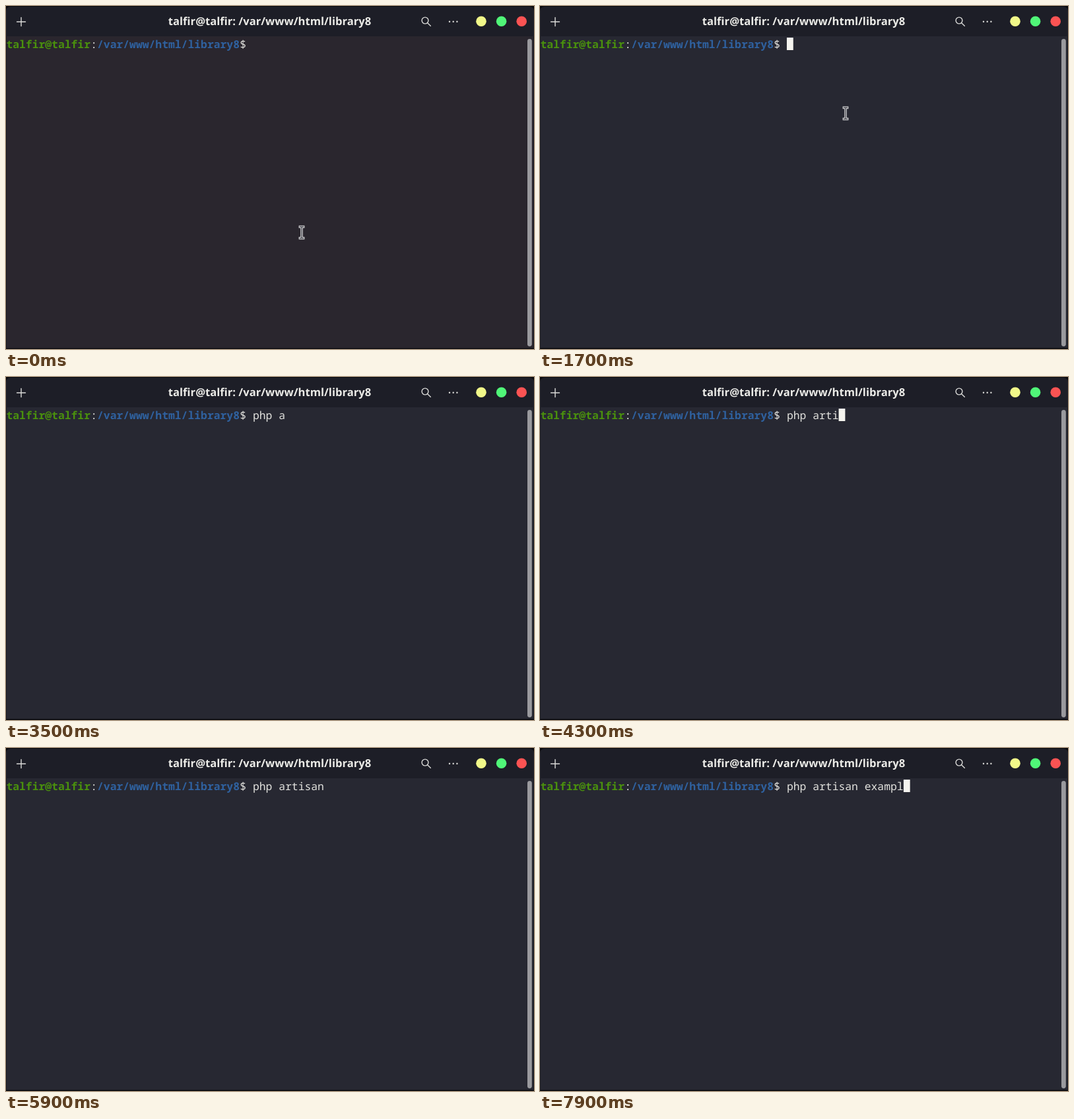
An HTML page for the animation above (8 s loop, 800 px wide and 521 px high).

```html
<!DOCTYPE html>
<html lang="en">
<head>
<meta charset="utf-8">
<title>Terminal</title>
<style>
  html, body { margin: 0; width: 100%; height: 100%; overflow: hidden; background: #08080b; }
  svg { display: block; width: 800px; height: 521px; }
  text { white-space: pre; text-rendering: geometricPrecision; }
  .title { font: 700 16.6px "Noto Sans", "Open Sans", sans-serif; fill: #ebebe7; text-anchor: middle; }
  .term { font: 500 16.38px "Noto Sans Mono", "DejaVu Sans Mono", monospace; fill: #e2e2de; }
  .bold { font-weight: 700; }
  .user { fill: #4a910d; }
  .path { fill: #2f619f; }
  .icon { fill: none; stroke: #dcdcda; stroke-width: 1.4; stroke-linecap: round; }
  .beam { fill: none; stroke: #d0d0d2; stroke-width: 3.6; stroke-linecap: square; }
  .beam.core { stroke: #3c3d45; stroke-width: 1.2; }
</style>
</head>
<body>
<svg viewBox="0 0 800 521">
  <defs>
    <path id="ibeam" d="M-2.6-8.6H2.6M0-8.6V8.6M-2.6 8.6H2.6"/>
  </defs>

  <path fill="#272832" d="M0 40H800V519.5H0Z"/>
  <path id="tint" fill="#2b272f" d="M0 46H800V519.5H0Z"/>
  <path fill="#1d1e27" d="M0 46V8Q0 1 7 1H793Q800 1 800 8V46Z"/>
  <path stroke="#17181f" d="M.5 46V519.5M799.5 46V519.5"/>

  <path class="icon" d="M16.5 24H29.5M23 17.5V30.5"/>
  <text class="title" x="399.5" y="29">talfir@talfir: /var/www/html/library8</text>
  <g class="icon">
    <circle cx="635" cy="22" r="4.9"/>
    <path d="M638.7 25.7L643.3 30.3"/>
  </g>
  <g fill="#dcdcda">
    <circle cx="672" cy="23.7" r="1.2"/>
    <circle cx="677.7" cy="23.7" r="1.2"/>
    <circle cx="683.4" cy="23.7" r="1.2"/>
  </g>
  <circle cx="720" cy="23.2" r="7.8" fill="#f1f889"/>
  <circle cx="750.6" cy="23.2" r="7.8" fill="#50f678"/>
  <circle cx="781.2" cy="23.2" r="7.8" fill="#fb5353"/>

  <rect x="790" y="50" width="6.8" height="467" rx="3.4" fill="#9a9a9e"/>

  <g class="term">
    <text class="bold user" data-col="0" y="64">talfir@talfir</text>
    <text data-col="13" y="64">:</text>
    <text class="bold path" data-col="14" y="64">/var/www/html/library8</text>
    <text data-col="36" y="64">$</text>
    <text id="typed" data-col="38" y="64"></text>
  </g>
  <rect id="caret" y="48" width="9.8" height="19" fill="#f5f4ef"/>

  <g id="mouse">
    <use href="#ibeam" class="beam"/>
    <use href="#ibeam" class="beam core"/>
  </g>
</svg>
<script>
  const LOOP = 8000, BLINK = 600, CELL = 9.83, LEFT = 0.4, PROMPT = 38;
  const COMMAND = "php artisan exampl";
  // Time of each key press, in ms
  const KEYS = [1900, 2100, 2200, 2800, 2900, 3700, 3900, 4100, 4600,
                4800, 5000, 5300, 6700, 6900, 7300, 7500, 7600, 7800];
  const [typed, caret, mouse, tint] =
    ["typed", "caret", "mouse", "tint"].map(id => document.getElementById(id));
  const colX = col => LEFT + col * CELL;
  const show = (el, on) => el.setAttribute("visibility", on ? "visible" : "hidden");

  for (const el of document.querySelectorAll("[data-col]")) el.setAttribute("x", colX(+el.dataset.col));

  function draw(t) {
    const count = KEYS.filter(k => k <= t).length;
    typed.textContent = COMMAND.slice(0, count);

    // Each key press restarts the blink
    const since = t - (count ? KEYS[count - 1] : 400);
    caret.setAttribute("x", colX(PROMPT + count));
    show(caret, Math.floor(since / BLINK) % 2 === 0);

    // The pointer glides up while the warm tint fades, and hides once typing begins
    const p = Math.min(t / 500, 1), ease = p * p * (3 - 2 * p);
    mouse.setAttribute("transform", `translate(${448 + 15 * ease} ${344 - 181 * ease})`);
    show(mouse, count === 0);
    tint.setAttribute("opacity", 1 - p);
  }

  function tick() {
    draw(performance.now() % LOOP);
    requestAnimationFrame(tick);
  }
  tick();
</script>
</body>
</html>
```
